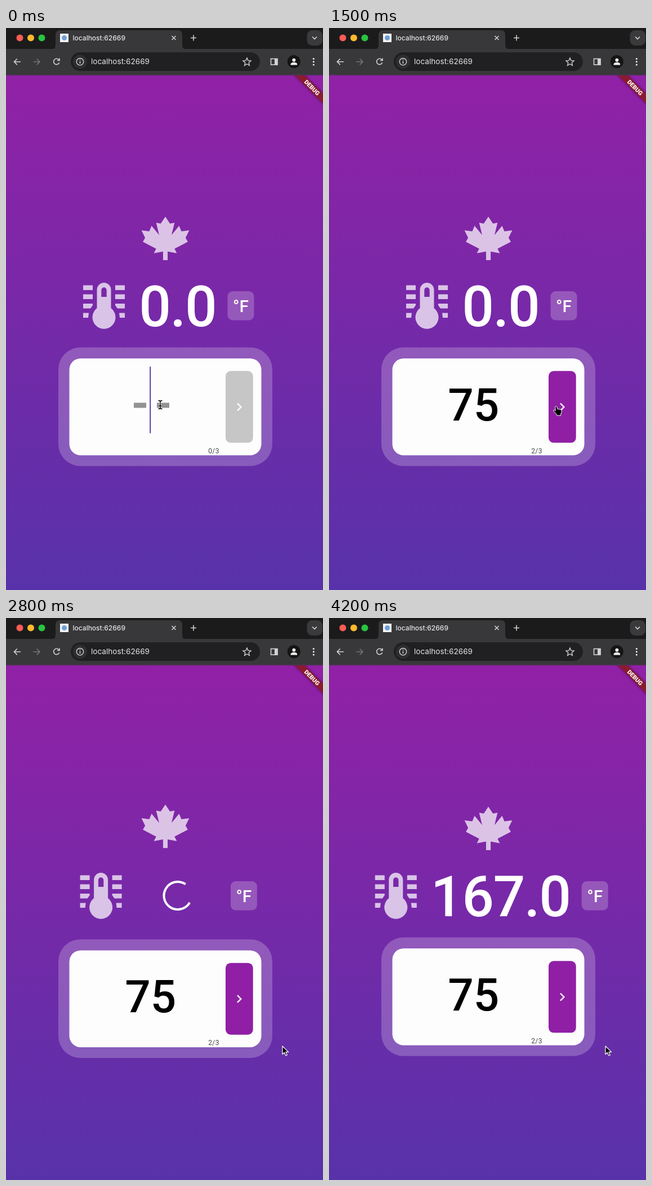
An HTML page that plays this animation: 563x995 px, repeating every 4300 ms.

```html
<!DOCTYPE html>
<html lang="en">
<head>
<meta charset="utf-8">
<title>Temperature converter</title>
<style>
html, body { margin: 0; width: 100%; height: 100%; overflow: hidden; background: #5932aa; }
svg { display: block; }
text { font-family: Roboto, sans-serif; font-weight: 500; }
.ui { font-family: Inter, sans-serif; fill: #e6e6e8; }
.line { fill: none; stroke: #d2d2d4; stroke-width: 1.6; }
.mid { text-anchor: middle; }
.soft { fill: #fff; fill-opacity: .72; }
.glass { fill: #fff; fill-opacity: .22; }
.cursor { stroke-linejoin: round; }
</style>
</head>
<body>
<svg width="563" height="995" viewBox="0 0 563 995">
  <defs>
    <linearGradient id="sky" x2="0" y2="1">
      <stop stop-color="#9121a6"/>
      <stop offset="1" stop-color="#5832aa"/>
    </linearGradient>
    <filter id="blur" x="-20%" y="-80%" width="140%" height="260%"><feGaussianBlur stdDeviation="2.5"/></filter>
    <clipPath id="page"><rect y="84" width="563" height="911"/></clipPath>
    <g id="bars">
      <path d="M-37 455.5h17v8.5h-17zM-37 471.5h17v8.5h-17zM-37 488h17v3l-4 5.500h-13zM-37 504.500h10l-1 8.500h-9z"/>
    </g>
  </defs>

  <!-- Page -->
  <rect y="84" width="563" height="911" fill="url(#sky)"/>
  <g clip-path="url(#page)">
    <g transform="translate(563 84) rotate(45)">
      <rect x="-42" y="23" width="84" height="12" opacity=".5" filter="url(#blur)"/>
      <rect x="-42" y="23" width="84" height="12" fill="#8c1a2f"/>
      <text class="mid" x="1.500" y="32.700" font-size="10.500" style="font-weight:900" fill="#fff">DEBUG</text>
    </g>
  </g>

  <g id="leaf">
    <path class="soft" transform="translate(234.100 325.900) scale(4.075 4.050)" d="M21.800 13 16 16l1 2-4-.75V21h-2v-3.750L7 18l1-2-5.800-3 1-1.730L1.600 8 5 8.430 6 6l3.300 4L8 4.670l2 .33 2-3 2 3 2-.33L14.700 10 18 6l1 2.430L22.400 8l-1.600 3.270z"/>
  </g>

  <g id="meter" class="soft">
    <use href="#bars"/>
    <use href="#bars" transform="scale(-1 1)"/>
    <path fill-rule="evenodd" d="M-12.500 463.500a12.500 12.500 0 0 1 25 0V496a20.500 20.500 0 1 1-25 0zM-4.700 476h9.400v-12a4.700 4.700 0 0 0-9.400 0z"/>
  </g>

  <text id="result" class="mid" x="304.700" y="527.500" font-size="100" letter-spacing="-1.500" fill="#fff"></text>
  <path id="spinner" fill="none" stroke="#fff" stroke-width="4" stroke-linecap="square"/>

  <g id="unit">
    <rect class="glass" x="-23.500" y="466" width="47" height="51.500" rx="9"/>
    <text class="mid" y="503" font-size="30" fill="#fff">°F</text>
  </g>

  <g id="card">
    <rect class="glass" x="93" y="565.500" width="380" height="210" rx="39"/>
    <rect x="112.500" y="585" width="341" height="171.500" rx="20" fill="#fdfdfd"/>
    <path id="hint" fill="#929292" d="M227 663.500h22v9h-22zM268 663.500h22v9h-22z"/>
    <text id="entry" class="mid" x="256.800" y="694.500" font-size="80"></text>
    <rect id="caret" y="599.500" width="1.800" height="118" fill="#4d2f9c"/>
    <text id="count" x="359.200" y="753" font-size="12" letter-spacing=".4" fill="#444" style="font-weight:400"></text>
    <rect id="button" x="390" y="607.300" width="48.700" height="127" rx="9"/>
    <path d="M411 664.700l6.300 6.300-6.300 6.300" fill="none" stroke="#fff" stroke-width="2.400"/>
  </g>

  <!-- Browser bar -->
  <rect width="563" height="38" fill="#1b1b1c"/>
  <rect y="37" width="563" height="47" fill="#38383a"/>
  <rect y="82" width="563" height="2" fill="#4a3350"/>
  <path d="M80 38q8 0 8-8V12q0-8 8-8h209q8 0 8 8v18q0 8 8 8z" fill="#38383a"/>
  <circle cx="24.500" cy="17.500" r="6" fill="#fb5c55"/>
  <circle cx="44" cy="17.500" r="6" fill="#fdb92d"/>
  <circle cx="63.500" cy="17.500" r="6" fill="#28c440"/>
  <rect x="96" y="10" width="15" height="15" fill="#f4f6f8"/>
  <circle cx="103.500" cy="17.500" r="4.500" fill="#6f9fd8"/>
  <text class="ui" x="118.500" y="21.700" font-size="12">localhost:62669</text>
  <rect x="534.500" y="4" width="27.500" height="27" rx="9" fill="#3a3a3c"/>
  <path class="line" d="M294.500 14l7 7m0-7l-7 7M328 17.500h10m-5-5v10M544 15.500l4 4 4-4"/>
  <rect x="115" y="43" width="336" height="33" rx="16.500" fill="#202022"/>
  <circle cx="131.500" cy="59.700" r="12.500" fill="#2e2e30"/>
  <text class="ui" x="151" y="64.300" font-size="13.600" style="font-weight:400">localhost:62669</text>
  <g class="line">
    <path d="M26 59.800H14.500m5.300-5.300l-5.300 5.300 5.300 5.300"/>
    <path stroke="#747476" d="M48.500 59.800H60m-5.300-5.300l5.300 5.300-5.300 5.300"/>
    <path d="M94 56.300a5.200 5.200 0 1 0 .7 5M95 53.500v4h-4"/>
    <circle cx="131.500" cy="59.700" r="6.200" stroke-width="1.400"/>
    <path d="M131.500 58.700v4.300m0-7.300v1.500"/>
    <path stroke-width="1.400" d="M428 53l2 4.600 5 .5-3.800 3.300 1.100 4.900-4.300-2.600-4.300 2.600 1.100-4.900-3.800-3.300 5-.5z"/>
    <rect x="470.500" y="54.500" width="11.500" height="10.500"/>
  </g>
  <path d="M477 54h5.500v11.500H477z" fill="#d2d2d4"/>
  <circle cx="511.300" cy="59.500" r="11.500" fill="#151516"/>
  <g fill="#f2f2f2">
    <circle cx="511.300" cy="56.800" r="3"/>
    <path d="M505.500 65.500v-1.500c0-4.200 11.600-4.200 11.600 0v1.500z"/>
    <circle cx="546.300" cy="54.500" r="1.500"/><circle cx="546.300" cy="59.700" r="1.500"/><circle cx="546.300" cy="64.900" r="1.500"/>
  </g>

  <!-- Pointers, each with its hot spot at 0,0 -->
  <g id="pointer" class="cursor">
    <g id="beam" fill="none">
      <path d="M-3.500-7.500Q0-7.500 0-5V5Q0 7.500-3.500 7.500M3.500-7.500Q0-7.500 0-5V5Q0 7.500 3.500 7.500M-2 2h4" stroke="#fff" stroke-width="3"/>
      <path d="M-3.500-7.500Q0-7.500 0-5V5Q0 7.500-3.500 7.500M3.500-7.500Q0-7.500 0-5V5Q0 7.500 3.500 7.500M-2 2h4" stroke="#000" stroke-width="1.400"/>
    </g>
    <path id="hand" stroke="#fff" d="M-1.500 1.500q1.500-2 3 0l1.500 4.500q2-1.200 2.500.3 2-.9 2.500.6 2.200-.5 2 2.100 0 3-1.500 5v3H1.500l-1-2.500-5-5.500q-.2-2.300 2-1.500l1.500 1.200z"/>
    <path id="arrow" stroke="#fff" stroke-width="1.200" d="M0 0v14.500l3.400-3.200 2.300 5.400 2.500-1.100-2.300-5.200h4.700z"/>
  </g>
</svg>
<script>
const LOOP = 4300, FRAME = 100;
const FIRST_KEY = 100, SECOND_KEY = 600, CARET_OFF = 1100;
const LOAD = 2255, DONE = 3700;
// Time, x, y of the pointer's hot spot
const MOVES = [[800, 274, 667], [1100, 319, 669], [1600, 413, 669], [2300, 413, 669], [2800, 491, 758]];

const $ = id => document.getElementById(id);
const clamp = v => Math.min(1, Math.max(0, v));
const mix = (a, b, k) => a + (b - a) * k;
const show = (id, on) => $(id).setAttribute('display', on ? 'inline' : 'none');
const move = (id, x, y) => $(id).setAttribute('transform', `translate(${x} ${y})`);

// Cubic Bezier (0.4, 0, 0.2, 1)
function ease(x) {
  let lo = 0, hi = 1, s = .5;
  for (let i = 0; i < 18; i++) {
    s = (lo + hi) / 2;
    const bx = 1.2 * s * (1 - s) ** 2 + .6 * s * s * (1 - s) + s ** 3;
    if (bx < x) lo = s; else hi = s;
  }
  return s * s * (3 - 2 * s);
}

function arc(ms) {
  const phase = ms / 1333 % 1, full = Math.PI * 1.5;
  const head = ease(clamp(phase * 2)), tail = ease(clamp(phase * 2 - 1));
  const start = -Math.PI / 2 + tail * full + ms / 2222 * 2 * Math.PI + phase * Math.PI / 2;
  const sweep = Math.max((head - tail) * full, .01);
  const at = a => `${305 + 24.5 * Math.cos(a)} ${491.5 + 24.5 * Math.sin(a)}`;
  return `M${at(start)}A24.5 24.5 0 ${+(sweep > Math.PI)} 1 ${at(start + sweep)}`;
}

function pointerAt(t) {
  const next = MOVES.findIndex(m => m[0] > t);
  if (next < 0) return MOVES.at(-1).slice(1);
  if (next === 0) return MOVES[0].slice(1);
  const [t0, x0, y0] = MOVES[next - 1], [t1, x1, y1] = MOVES[next];
  const k = (t - t0) / (t1 - t0), s = k * k * (3 - 2 * k);
  return [mix(x0, x1, s), mix(y0, y1, s)];
}

function draw(t) {
  const typed = t < FIRST_KEY ? '' : t < SECOND_KEY ? '7' : '75';
  const loading = t >= LOAD && t < DONE, done = t >= DONE;

  $('entry').textContent = typed;
  $('count').textContent = typed.length + '/3';
  show('hint', !typed);
  show('caret', t < CARET_OFF);
  $('caret').setAttribute('x', 255.3 + typed.length * 22.7);
  const k = clamp((t - FIRST_KEY) / 200);
  $('button').setAttribute('fill', `rgb(${mix(198, 144, k)} ${mix(198, 31, k)} ${mix(198, 165, k)})`);

  $('result').textContent = loading ? '' : done ? '167.0' : '0.0';
  show('spinner', loading);
  if (loading) $('spinner').setAttribute('d', arc(t - LOAD));
  const spread = loading ? 5.4 : done ? 55.2 : 0;
  move('meter', 174 - spread, 0);
  move('unit', 417 + spread, 0);
  move('leaf', 0, loading ? -3.7 : 0);
  move('card', 0, loading ? 3.4 : 0);

  const [x, y] = pointerAt(t);
  const onButton = x > 390 && x < 439 && y > 607 && y < 735;
  const onField = x < 390;
  show('pointer', t < FIRST_KEY || t >= MOVES[0][0]);
  move('pointer', x, y);
  show('beam', onField);
  show('hand', onButton);
  show('arrow', !onField && !onButton);
}

function tick(now) {
  draw(Math.floor(now % LOOP / FRAME) * FRAME);
  requestAnimationFrame(tick);
}
draw(0);
requestAnimationFrame(tick);
</script>
</body>
</html>
```
